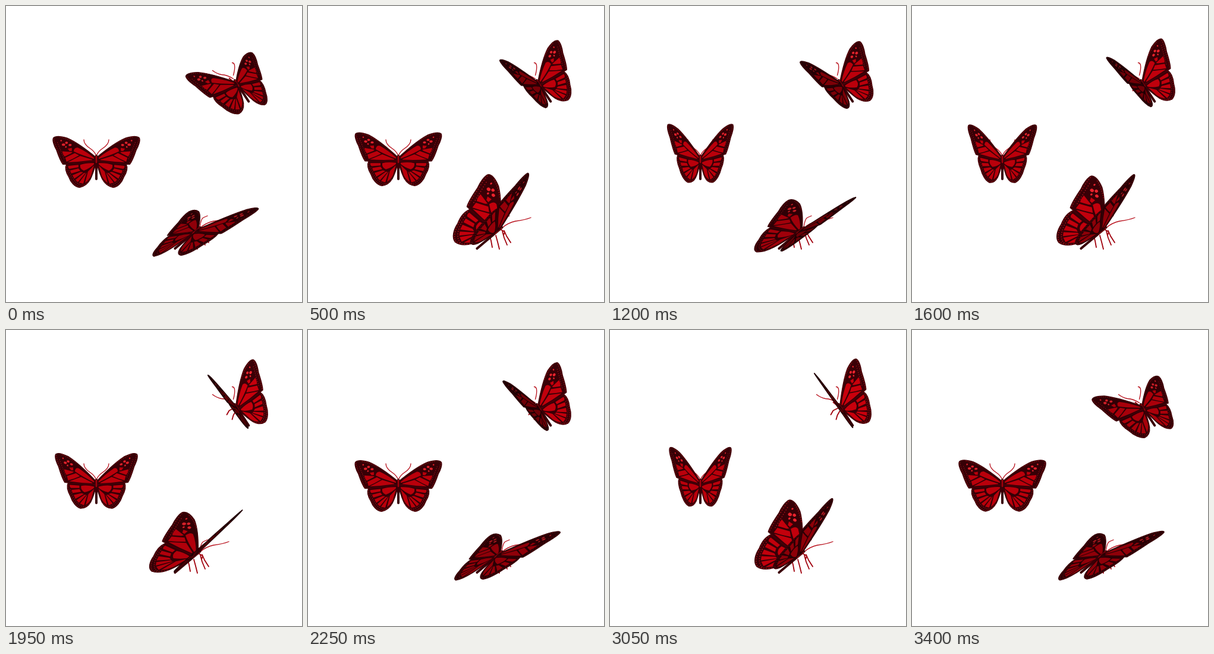
These frames come from a looping animation (498 px wide and 498 px high, 3450 ms). An HTML page without scripts:

```html
<!DOCTYPE html>
<html lang="en">
<head>
<meta charset="utf-8">
<title>Three butterflies</title>
<style>
@property --flap { syntax: "<angle>"; inherits: true; initial-value: 0deg; }

html, body { margin: 0; width: 100%; height: 100%; overflow: hidden; background: #fff; }
svg { display: block; width: 498px; height: 498px; }

/* Each butterfly is a pair of flat wings hinged on the body:
   x = outward direction, n = upward direction, v = body axis, all as seen on screen;
   c = constant lean of both wings. */
.butterfly { animation: 3450ms linear infinite; }
.left   { --xx: 1.01; --xy: 0;    --nx: 0;   --ny: -.405; --cx: 0;    --cy: 0;   --vx: 0;     --vy: 1;   animation-name: flap-left; }
.top    { --xx: .78;  --xy: -.27; --nx: .37; --ny: -.67;  --cx: -.09; --cy: .05; --vx: .6;    --vy: .91; animation-name: flap-top; }
.bottom { --xx: .81;  --xy: -.03; --nx: -.5; --ny: -1.02; --cx: .05;  --cy: 0;   --vx: -1.08; --vy: .91; animation-name: flap-bottom; }

.wing {
  --side: 1;
  --light: 1;
  transform: matrix(
    calc(var(--side) * var(--xx) * cos(var(--flap)) + var(--nx) * sin(var(--flap)) + var(--cx)),
    calc(var(--side) * var(--xy) * cos(var(--flap)) + var(--ny) * sin(var(--flap)) + var(--cy)),
    var(--vx), var(--vy), 0, 0);
  filter: brightness(var(--light));
}
.mirror { --side: -1; }
.left .wing { --light: .93; }
.top .wing { --light: calc(.85 + .2 * sin(var(--flap))); }
.top .mirror { --light: calc(.85 - .52 * sin(var(--flap))); }
.bottom .mirror { --light: calc(.72 + .32 * sin(var(--flap))); }
.bottom .near {
  --tilt: sin(var(--flap) - 26deg);
  --light: calc(.38 + .75 * max(var(--tilt), -1 * var(--tilt)));
}

.membrane { fill: #3a0006; stroke: #4a0008; stroke-width: 1.4; stroke-linejoin: round; vector-effect: non-scaling-stroke; }
.cell { fill: #c8000c; }
.rim { fill: none; stroke: #b8141e; stroke-width: 1.3; stroke-linecap: round; stroke-dasharray: 0 3.3; }
.spot { fill: #f0242e; }
.body { fill: none; stroke: #3a0006; stroke-width: 4; stroke-linecap: round; vector-effect: non-scaling-stroke;
  transform: matrix(1, 0, var(--vx), var(--vy), 0, 0); }
.thorax { stroke: #a0000c; stroke-width: 2.5; }
.feeler { fill: none; stroke: #b8101c; stroke-width: 1.3; stroke-linecap: round; }
.leg { fill: none; stroke: #a0000c; stroke-width: 1.8; stroke-linecap: round; stroke-linejoin: round; }

@keyframes flap-left {
  0% { --flap: -6deg; }
  2.2% { --flap: -7deg; }
  8% { --flap: 13deg; }
  14.49% { --flap: 8deg; }
  20% { --flap: -4deg; }
  31% { --flap: 35deg; }
  34.78% { --flap: 41deg; }
  40% { --flap: 49deg; }
  47.83% { --flap: 36deg; }
  56.52% { --flap: 20deg; }
  64% { --flap: -7deg; }
  73.91% { --flap: -5deg; }
  81% { --flap: 24deg; }
  88.41% { --flap: 45deg; }
  91% { --flap: 38deg; }
  96% { --flap: 4deg; }
  98.55% { --flap: -5deg; }
  100% { --flap: -6deg; }
}
@keyframes flap-top {
  0% { --flap: 0deg; }
  3% { --flap: 1deg; }
  14.49% { --flap: 29deg; }
  16% { --flap: 36deg; }
  20% { --flap: 49deg; }
  24% { --flap: 53deg; }
  31.5% { --flap: 41deg; }
  34.78% { --flap: 26deg; }
  40.5% { --flap: 2deg; }
  47.83% { --flap: 42deg; }
  53% { --flap: 53deg; }
  56.52% { --flap: 47deg; }
  64% { --flap: 42deg; }
  70% { --flap: 8deg; }
  73.91% { --flap: 2deg; }
  79.7% { --flap: 42deg; }
  84% { --flap: 53deg; }
  88.41% { --flap: 51deg; }
  95.65% { --flap: 15deg; }
  98.55% { --flap: 1deg; }
  100% { --flap: 0deg; }
}
@keyframes flap-bottom {
  0% { --flap: -1deg; }
  2% { --flap: 1deg; }
  8% { --flap: 32deg; }
  14.49% { --flap: 55deg; }
  17% { --flap: 56deg; }
  24% { --flap: 33deg; }
  31% { --flap: -3deg; }
  34.78% { --flap: 14deg; }
  41% { --flap: 38deg; }
  48% { --flap: 56deg; }
  51% { --flap: 55deg; }
  56.52% { --flap: 31deg; }
  64.5% { --flap: -3deg; }
  73.91% { --flap: 29deg; }
  81.5% { --flap: 56deg; }
  88.41% { --flap: 52deg; }
  95.65% { --flap: 11deg; }
  97.1% { --flap: 2deg; }
  98.55% { --flap: 0deg; }
  100% { --flap: -1deg; }
}
</style>
</head>
<body>
<svg viewBox="0 0 498 498">
  <defs>
    <g id="wing">
      <path class="membrane" d="M1 3L50 6C53 12 51 20 46 28C43 37 36 45 28 46C20 45 14 40 10 33C6 25 3 15 1 8Z"/>
      <path class="cell" d="M4 6Q18 5 27 8Q28 15 21 18Q10 14 4 8Z
        M30 8L47 9Q48 12 45 14L30 12Z
        M30 14L44 17L42 22L27 18Z
        M26 20L40 25L37 31L22 21Z
        M21 22L35 33L31 37L18 22Z
        M16 21L29 38L22 40Z
        M4 10L14 20L19 39Q12 34 9 27Z"/>
      <path class="rim" d="M50 10Q50 20 44 29Q38 42 28 45Q18 43 11 34"/>
      <path class="rim" d="M46 17Q42 29 35 36Q29 42 22 42"/>

      <path class="membrane" d="M0 -3C15 -16 32 -30 49 -38C58 -41 68 -43 72 -39C74 -35 71 -26 67 -19C64 -10 60 1 56 6C40 6 20 4 0 2Z"/>
      <path class="cell" d="M4 -3Q17 -14 31 -21Q37 -22 38 -15Q25 -8 4 -1Z
        M41 -21L48 -20L45 -16L41 -16Z
        M40 -14L57 -16Q56 -10 53 -7L42 -12Z
        M36 -12L52 -5L50 2Q40 -2 29 -8Z
        M7 0L27 -7L48 3Q28 3 7 1Z"/>
      <path class="rim" d="M71 -37Q69 -28 65 -19Q61 -6 56 4"/>
      <path class="rim" d="M65 -31Q62 -23 59 -16L54 -3"/>
      <path class="rim" d="M36 -30Q48 -37 62 -40"/>
      <g class="spot">
        <ellipse cx="44" cy="-26" rx="2.6" ry="1.8"/>
        <ellipse cx="50" cy="-30" rx="2.4" ry="1.8"/>
        <ellipse cx="55" cy="-27" rx="2.8" ry="2"/>
        <circle cx="51" cy="-23" r="1.4"/>
        <circle cx="59" cy="-34" r="1.3"/>
      </g>
    </g>
    <g id="torso">
      <path class="body" d="M0 -6V33"/>
      <path class="body thorax" d="M0 -5V5"/>
    </g>
  </defs>

  <g transform="translate(152 258)">
    <g class="butterfly left">
      <path class="feeler" d="M-1 -8Q-4 -14 -10 -18Q-21 -25 -21 -33M1 -8Q4 -14 10 -18Q21 -25 21 -33"/>
      <use href="#wing" class="wing mirror"/>
      <use href="#wing" class="wing"/>
      <use href="#torso"/>
    </g>
  </g>

  <g transform="translate(388.5 130.5)">
    <g class="butterfly top">
      <path class="feeler" d="M-6 -14Q-3 -25 -4 -31Q-5 -35 -8 -35M-6 -8Q-17 -15 -26 -15Q-35 -17 -41 -22"/>
      <path class="leg" d="M-5 1L-13 5L-17 12M-2 6L-6 13L-8 20M-6 -3L-13 -9"/>
      <use href="#wing" class="wing"/>
      <use href="#torso"/>
      <use href="#wing" class="wing mirror"/>
    </g>
  </g>

  <g transform="translate(320 378)">
    <g class="butterfly bottom">
      <path class="feeler" d="M6 -6Q8 -20 12 -22L19 -25M7 -5Q16 -13 29 -16Q45 -18 55 -22"/>
      <path class="leg" d="M-14 10L-12 17L-10 28M-4 8L-1 19L2 31M7 1L10 12L15 24M10 0L14 9L21 20M4 -2L11 2L9 8"/>
      <use href="#wing" class="wing mirror"/>
      <use href="#torso"/>
      <use href="#wing" class="wing near"/>
    </g>
  </g>
</svg>
</body>
</html>
```
